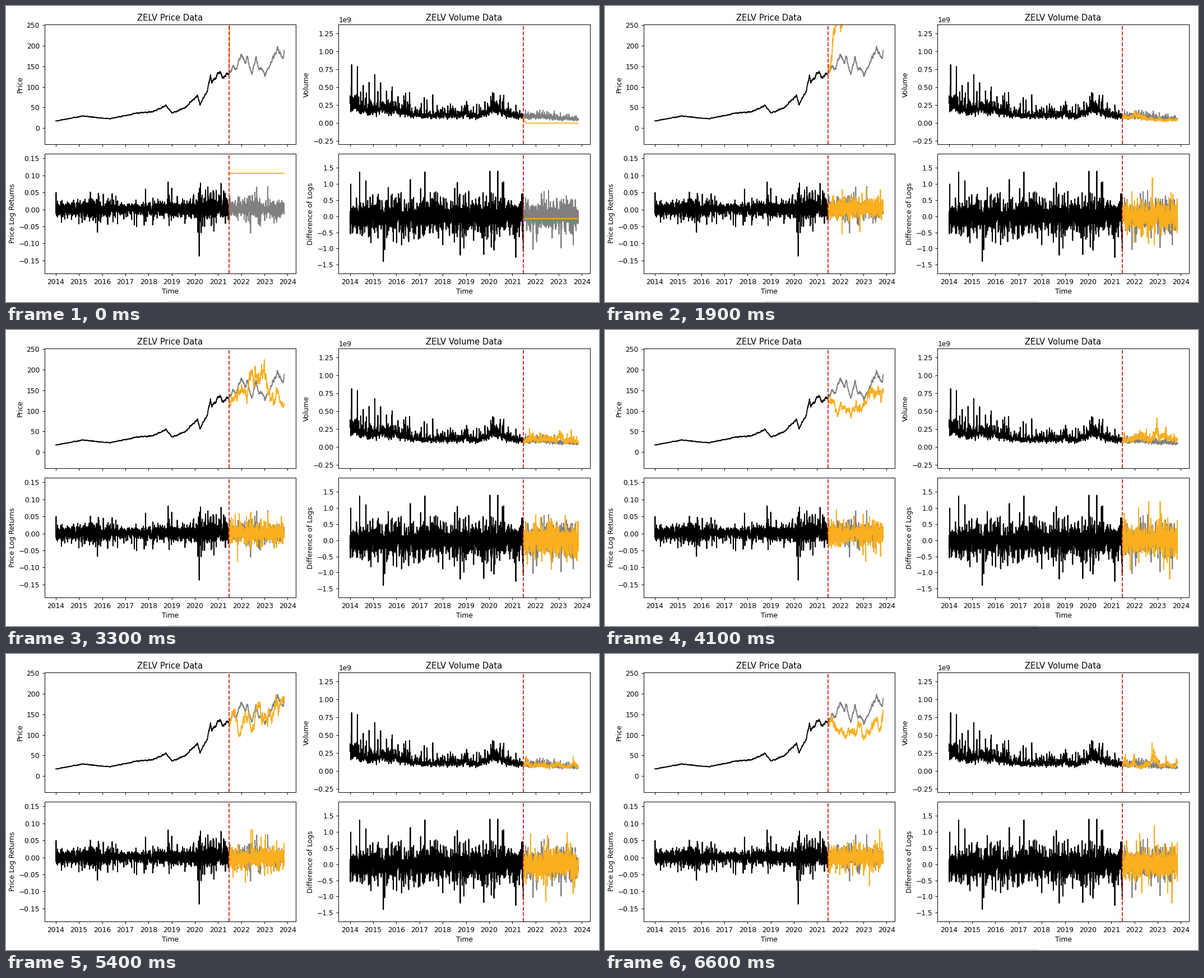
A matplotlib script that plays this animation: 1058x529 px, repeating every 6.7 s.

```python
import numpy as np
import matplotlib.pyplot as plt
import matplotlib.dates as mdates
from matplotlib.animation import FuncAnimation
from matplotlib.patches import FancyBboxPatch

W, H = 1058, 529
EPOCHS, INTERVAL = 67, 100
ORANGE, RED, GRAY = "#faaf1e", "#c8291e", "gray"
TICKER = "ZELV"

days = np.arange("2014-01-02", "2023-11-09", dtype="datetime64[D]")
days = days[np.is_busday(days)]
dates = mdates.date2num(days)
years = 2014 + (dates - mdates.date2num(np.datetime64("2014-01-01"))) / 365.25
split = int(np.searchsorted(days, np.datetime64("2021-06-24")))
n_all, n_future = len(days), len(days) - split


def fat_tails(rng, n):
    """Clipped heavy-tailed noise of about unit variance."""
    return np.clip(.775 * rng.standard_t(5, n), -5, 5)


def wander(steps, phi):
    """Autocorrelated noise that starts at zero and tends to unit variance."""
    out = np.zeros(len(steps))
    for k in range(1, len(steps)):
        out[k] = phi * out[k - 1] + np.sqrt(1 - phi * phi) * steps[k]
    return out


def curve(points):
    return np.interp(years, *zip(*points))


def bump(center, width):
    return np.exp(-((years - center) / width) ** 2)


def logistic(x):
    return 1 / (1 + np.exp(-x))


# Observed series
PRICE_KEYS = [
    (2014, 17), (2015.15, 29), (2016.35, 22.5), (2017.4, 35), (2018.2, 40),
    (2018.75, 54.5), (2019.01, 36), (2019.6, 50), (2020.12, 79), (2020.22, 57),
    (2020.55, 94), (2020.67, 129), (2020.72, 110), (2021.07, 138), (2021.18, 120),
    (2021.48, 133), (2021.68, 152), (2021.77, 141), (2021.98, 178), (2022.2, 156),
    (2022.24, 174), (2022.46, 132), (2022.63, 171), (2022.76, 142), (2022.88, 148),
    (2023.01, 127), (2023.56, 193), (2023.81, 169), (2023.85, 184)]
VOLUME_KEYS = [
    (2014, .28), (2014.5, .2), (2015.6, .19), (2017, .11), (2018.1, .12),
    (2019.5, .1), (2020.2, .2), (2021, .11), (2021.5, .08), (2022.2, .09), (2023.85, .055)]


def observed_volume(rng):
    level = curve(VOLUME_KEYS) * (1 + .4 * bump(2018.95, .15))
    since_report = (years - 2014.07) % .25
    report = np.interp(years, [2014, 2016, 2023], [2.7, 2, 1]) * np.exp(-since_report / .006)
    report[years < 2014.07] = 0
    bursts = 1.5 * (rng.random(n_all) < .015) * rng.random(n_all)
    daily = np.exp(.24 * wander(rng.standard_normal(n_all), .5))
    return 1e9 * level * (daily + report + bursts)


def observed_returns(rng):
    scale = (.0125 - .0035 * bump(2017, .7) + .007 * bump(2015.65, .25)
             + .01 * bump(2018.97, .12) + .034 * bump(2020.21, .06)
             + .008 * bump(2020.6, .5) + .005 * bump(2022.5, .5))
    return np.clip(.001 + scale * fat_tails(rng, n_all), -.137, .113)


rng = np.random.default_rng(7)
price = curve(PRICE_KEYS) * np.exp(.016 * wander(rng.standard_normal(n_all), .88))
volume = observed_volume(rng)
returns = observed_returns(rng)
diffs = np.where(years < 2021.48, .28, .23) * fat_tails(rng, n_all)


def forecast(epoch):
    """A flat, biased guess that learns its level first and its texture later."""
    rng = np.random.default_rng(100 + epoch)
    n = np.arange(1, n_future + 1)
    bias = np.exp(-epoch / 1.8)
    texture = logistic((epoch - 13.7) / .45)
    price_drift = .1012 * bias + .005 * logistic((28 - epoch) / 2)
    volume_drift = -.0653 * bias - .0047 * logistic(18 - epoch)

    smooth = .8 * (1 - texture)
    ret = price_drift + .0165 * texture * wander(fat_tails(rng, n_future), smooth)
    diff = volume_drift + .24 * texture * wander(fat_tails(rng, n_future), smooth)

    sway = wander(rng.standard_normal(n_future), .99)
    log_price = (np.log(128) + price_drift * n + .12 * texture * (1 - np.exp(-n / 150))
                 + texture * (.17 * sway + .02 * wander(rng.standard_normal(n_future), .9)))
    crowd = wander(rng.standard_normal(n_future), .985)
    daily = wander(fat_tails(rng, n_future), .6)
    log_volume = (np.log(.085) + volume_drift * n
                  + texture * (.25 * (1 - np.exp(-n / 100)) + .3 * crowd + .22 * daily))
    return np.exp(np.minimum(log_price, 7)), 1e9 * np.exp(log_volume), ret, diff


# Stage
fig = plt.figure(figsize=(12, 6), dpi=88.1667)


def panel(left, top, ylim, ylabel, series, title=None):
    ax = fig.add_axes([left / W, 1 - (top + 214) / H, 448.2 / W, 214 / H])
    ax.plot(dates[:split + 1], series[:split + 1], color="black")
    ax.plot(dates[split:], series[split:], color=GRAY)
    line, = ax.plot([], [], color=ORANGE)
    ax.axvline(dates[split], color=RED, linestyle="--")
    ax.set_xlim(dates[0] - 180, dates[-1] + 180)
    ax.set_ylim(ylim)
    ax.set_ylabel(ylabel)
    ax.xaxis.set_major_locator(mdates.YearLocator())
    ax.xaxis.set_major_formatter(mdates.DateFormatter("%Y"))
    if title:
        ax.set_title(title)
        ax.tick_params(labelbottom=False)
    else:
        ax.set_xlabel("Time")
    return line


LEFT, RIGHT, TOP, BOTTOM = 68.55, 593.4, 33, 264
lines = [
    panel(LEFT, TOP, (-39.6, 251.9), "Price", price, f"{TICKER} Price Data"),
    panel(RIGHT, TOP, (-.293e9, 1.375e9), "Volume", volume, f"{TICKER} Volume Data"),
    panel(LEFT, BOTTOM, (-.188, .1638), "Price Log Returns", returns),
    panel(RIGHT, BOTTOM, (-1.775, 1.942), "Difference of Logs", diffs),
]

# Upper edge of a box that runs off the bottom of the stage
fig.add_artist(FancyBboxPatch((286.5, -40), 487, 40.8, transform=None, facecolor="white",
                              edgecolor="0.8", linewidth=1, alpha=.8,
                              boxstyle="round,pad=0,rounding_size=2.45"))


def update(epoch):
    for line, series in zip(lines, forecast(epoch)):
        line.set_data(dates[split:], series)
    return lines


anim = FuncAnimation(fig, update, frames=EPOCHS, interval=INTERVAL, repeat=True,
                     repeat_delay=0, init_func=lambda: update(0))
plt.show()
```
